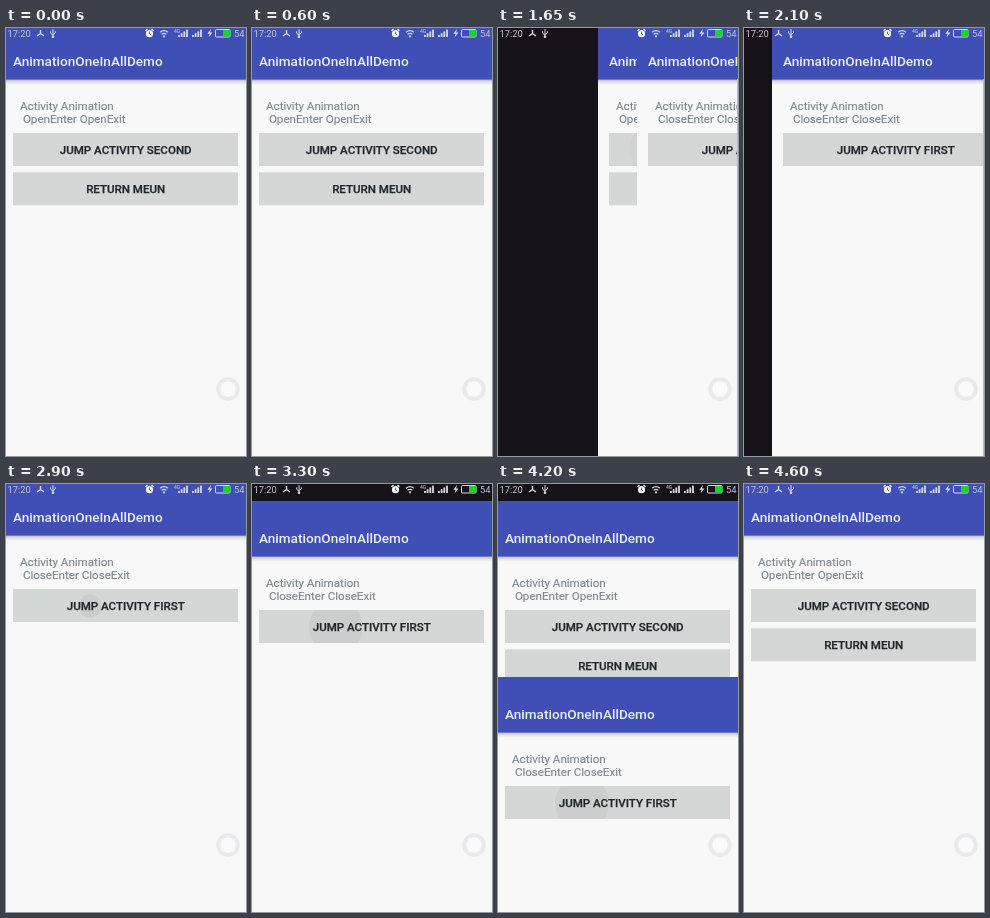
Recreate the animation shown at these times as an HTML page. Size 240x428 px, loop 4.65 s.

```html
<!DOCTYPE html>
<html lang="en">
<head>
<meta charset="utf-8">
<title>Activity transitions</title>
<style>
  html, body { margin: 0; width: 100%; height: 100%; overflow: hidden; background: #15121a; }
  svg { display: block; width: 100vw; height: 100vh; font-family: Roboto, sans-serif; }
  .title { font-size: 13.6px; font-weight: 500; fill: #eceef8; }
  .note { font-size: 11.6px; fill: #7d878e; stroke: #7d878e; stroke-width: .15px; }
  .label { font-size: 11.55px; font-weight: 500; fill: #20272b; stroke: #20272b; stroke-width: .25px; text-anchor: middle; }
  .clock { font-size: 9.4px; fill: #c3c5cf; }
</style>
</head>
<body>
<svg id="stage" viewBox="0 0 240 428" xmlns="http://www.w3.org/2000/svg">
  <defs>
    <linearGradient id="shade" x2="0" y2="1">
      <stop offset="0" stop-color="#8088b0" stop-opacity=".8"/>
      <stop offset=".3" stop-color="#b4b6c2" stop-opacity=".6"/>
      <stop offset="1" stop-color="#d0d0d4" stop-opacity="0"/>
    </linearGradient>
    <clipPath id="face"><rect x="7" y="105" width="225" height="33"/></clipPath>
  </defs>
  <rect width="240" height="428" fill="#15121a"/>
  <g id="pages"></g>
  <rect id="edge" x="239" y="51" width="1" height="377" fill="#a4c0cb"/>

  <g id="assist">
    <circle cx="222" cy="361" r="10.3" fill="#fafafa" stroke="#e9e9ec" stroke-width="3"/>
    <circle cx="222" cy="361" r="8.3" fill="none" stroke="#e1e1e5" stroke-width=".8"/>
  </g>

  <g id="status" fill="#d8dae2">
    <text class="clock" x="1.5" y="8.5">17:20</text>
    <path d="M34.500 2v3.500M34.500 5.500l-3.500 2.500M34.500 5.500l3.500 2.500" fill="none" stroke="#d8dae2" stroke-width="1.400"/>
    <path d="M47 1v8M44.700 3.300v2l2.300 1.800M49.300 3.300v1.800l-2.300 1.400" fill="none" stroke="#d8dae2"/>
    <circle cx="47" cy="8.700" r="1.300"/>
    <circle cx="143.500" cy="5.700" r="3.600" fill="#f2f3f6"/>
    <path d="M139.500 2.700l2-1.700M147.500 2.700l-2-1.700" stroke="#f2f3f6" stroke-width="1.300"/>
    <path d="M143.500 3.700v2.200l1.600 .8" fill="none" stroke="#3f4fb6" stroke-width=".9"/>
    <path d="M154 4.200q4-3.200 8 0M155.600 6.300q2.400-1.900 4.800 0" fill="none" stroke="#d8dae2" stroke-width="1.100"/>
    <circle cx="158" cy="8.300" r="1.100"/>
    <text x="168" y="4.500" font-size="5">4G</text>
    <g id="bars"></g>
    <path d="M205 .8l-3.600 4.900h2.200l-1 3.800 3.800-5.100h-2.300z"/>
    <rect x="209.500" y="1.500" width="14.500" height="7.500" rx="1" fill="none" stroke="#d8dae2"/>
    <rect x="217" y="2" width="7.500" height="6.500" fill="#1fd32a"/>
    <text class="clock" x="228" y="8.500">54</text>
  </g>
</svg>
<script>
const LOOP = 4650, STEP = 50;
const LEFT = -4, TOP = -4, WIDTH = 247, HALF = 218;
const OPEN = { at: 1016, span: 1414 };
const CLOSE = { at: 3000, span: 1500 };
const $ = id => document.getElementById(id);

function make(tag, attrs, parent, text) {
  const el = document.createElementNS('http://www.w3.org/2000/svg', tag);
  for (const key in attrs) el.setAttribute(key, attrs[key]);
  if (text) el.textContent = text;
  parent.appendChild(el);
  return el;
}

function band(page, y, height, fill) {
  make('rect', { x: LEFT, y, width: WIDTH, height, fill }, page);
}

// The window reaches a little past the visible stage on the top and left.
function buildPage(note, labels, touchX) {
  const page = make('g', {}, $('pages'));
  band(page, TOP, 436, '#f8f8f8');
  band(page, 51, 6, 'url(#shade)');
  band(page, TOP, 55.5, '#3f4fb6');
  make('text', { class: 'title', x: 7, y: 38 }, page, 'AnimationOneInAllDemo');
  make('text', { class: 'note', x: 14, y: 82 }, page, 'Activity Animation');
  make('text', { class: 'note', x: 16.9, y: 95 }, page, note);
  const rowY = i => 105 + i * 39.3;
  labels.forEach((text, i) =>
    make('rect', { x: 7, y: rowY(i), width: 225, height: 33, fill: '#d5d7d7' }, page));
  const clip = make('g', { 'clip-path': 'url(#face)' }, page);
  const ripple = make('circle', { cx: touchX, cy: 122, r: 0, fill: '#000' }, clip);
  labels.forEach((text, i) =>
    make('text', { class: 'label', x: 119.7, y: rowY(i) + 21 }, page, text));
  return { page, ripple };
}

const first = buildPage('OpenEnter OpenExit', ['JUMP ACTIVITY SECOND', 'RETURN MEUN'], 54);
const second = buildPage('CloseEnter CloseExit', ['JUMP ACTIVITY FIRST'], 84);

for (const x of [172, 186])
  for (let i = 0; i < 4; i++)
    make('rect', { x: x + i * 2.7, y: 7 - i * 1.8, width: 1.8, height: 2 + i * 1.8 }, $('bars'));

function progress(t, { at, span }) {
  const u = Math.min(1, Math.max(0, (t - at) / span));
  return (1 - Math.cos(Math.PI * u)) / 2;
}

function place({ page }, x, y, shown) {
  page.setAttribute('transform', `translate(${Math.round(x)} ${Math.round(y)})`);
  page.setAttribute('display', shown ? 'inline' : 'none');
}

function press({ ripple }, t, start, end, alpha) {
  const u = Math.min(1, (t - start) / 400);
  const on = t >= start && t < end;
  ripple.setAttribute('r', on ? 6 + 21 * Math.sin(u * Math.PI / 2) : 0);
  ripple.setAttribute('fill-opacity', alpha);
}

function draw(t) {
  const open = progress(t, OPEN), close = progress(t, CLOSE);
  const opened = OPEN.at + OPEN.span, closed = CLOSE.at + CLOSE.span;
  const closing = t >= CLOSE.at;

  place(first, closing ? 0 : WIDTH * open, closing ? HALF * (1 - close) : 0, t < opened || closing);
  place(second, WIDTH * (1 - open), HALF * close, t >= OPEN.at && t <= closed);
  press(first, t, 850, opened, 0.02);
  press(second, t, 2830, closed + 1, 0.045);
  $('edge').setAttribute('display', t >= 1150 && t < opened ? 'inline' : 'none');
}

const begin = performance.now();
function tick() {
  const t = (performance.now() - begin) % LOOP;
  draw(Math.floor(t / STEP) * STEP);
  requestAnimationFrame(tick);
}
draw(0);
requestAnimationFrame(tick);
</script>
</body>
</html>
```
